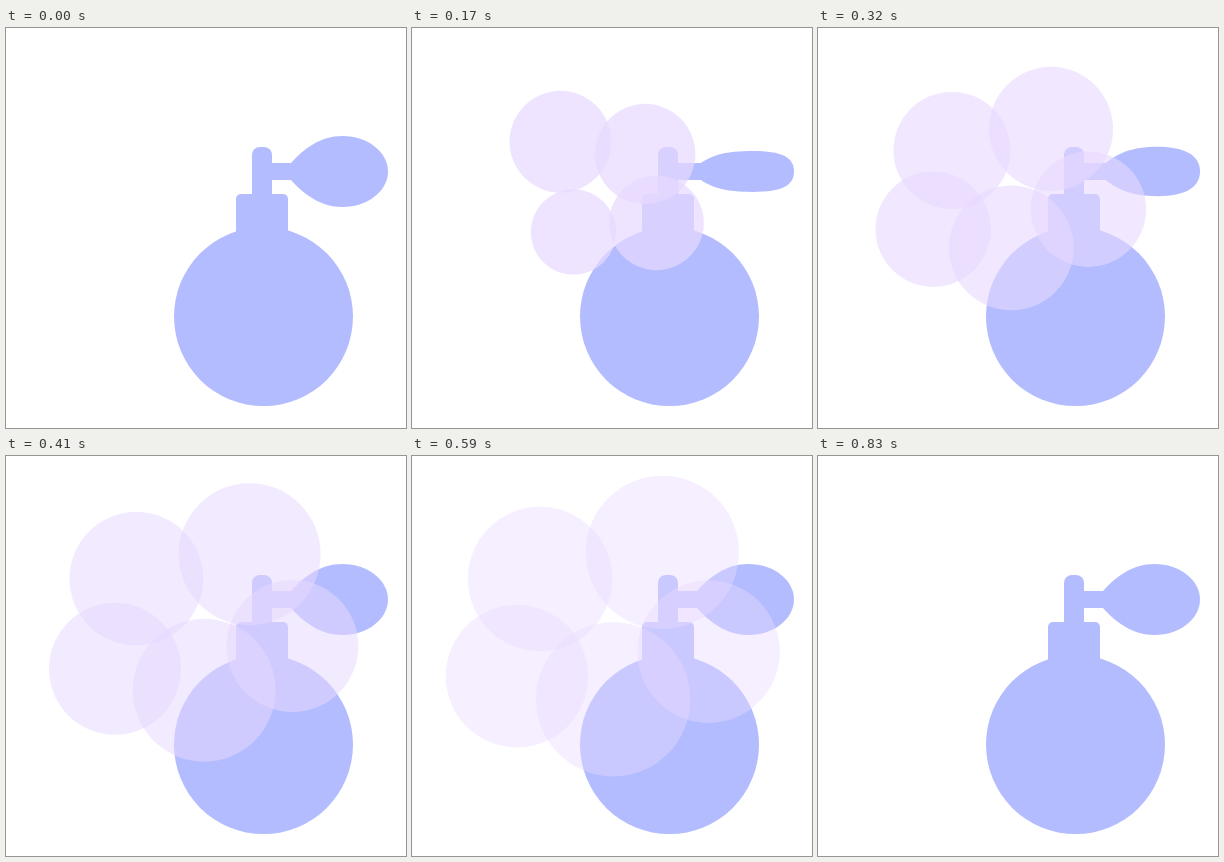
Write an HTML page that moves like this. It is 400 px wide and 400 px high and loops after 860 ms.

```html
<!DOCTYPE html>
<html lang="en">
<head>
<meta charset="utf-8">
<title>Perfume spray</title>
<style>
  html, body { margin: 0; width: 100%; height: 100%; overflow: hidden; background: #fff; }
  svg { display: block; width: 100vw; height: 100vh; }
</style>
</head>
<body>
<svg viewBox="0 0 400 400">
  <g fill="#b3bcff">
    <circle cx="257.5" cy="288.6" r="89.5"/>
    <rect x="230" y="166" width="52" height="60" rx="5"/>
    <rect x="246" y="119" width="20" height="60" rx="8"/>
    <rect x="256" y="135" width="34" height="17"/>
    <path id="bulb"/>
  </g>
  <g id="cloud" fill="#e8d9ff"></g>
</svg>
<script>
const LOOP = 860, START = 100, FADE = 590, END = 830;
const PIVOT = { x: 159, y: 120 };

// Three clouds replace one another; puffs are full-grown [x, y, radius]
const bursts = [
  { from: START, puffs: [[152, 118.5, 62], [248, 167, 45.5], [181.5, 231, 48.5]] },
  { from: 165, puffs: [[144, 111, 72], [264, 128.5, 71], [162.5, 239, 60.5], [280, 226, 67]] },
  { from: 275, puffs: [[127.5, 123, 73.5], [252, 96, 78], [104, 222, 72.5], [299, 197, 72.5], [202, 245.5, 78.5]] }
];

const bulb = document.getElementById('bulb');
const cloud = document.getElementById('cloud');

function add(parent, tag, attrs = {}) {
  const el = document.createElementNS('http://www.w3.org/2000/svg', tag);
  for (const name in attrs) el.setAttribute(name, attrs[name]);
  return parent.appendChild(el);
}

for (const burst of bursts) {
  burst.el = add(cloud, 'g');
  for (const [cx, cy, r] of burst.puffs) add(burst.el, 'circle', { cx, cy, r });
}

const mix = (a, b, u) => a + (b - a) * u;
const grow = age => 1 - 0.31 * Math.exp(-age / 110);

function drawBulb(t) {
  const squeezed = t >= START && t < 410;
  const open = squeezed ? ((t - 210) / 200) ** 2 : 1;
  const cy = 143.5, h = mix(19.8, 35.5, open);
  const left = mix(289, 285, open), mid = mix(341, 336.5, open);
  const c1 = mix(301, 297, open), c2 = mix(313, 314, open);
  const lift = mix(16, 22, open);
  const hx = mix(29, 25, open), hy = mix(14, 19.6, open);
  const top = cy - h, bottom = cy + h;
  bulb.setAttribute('d',
    `M${left} 135C${c1} ${cy - lift} ${c2} ${top} ${mid} ${top}` +
    `C${mid + hx} ${top} 382 ${cy - hy} 382 ${cy}` +
    `C382 ${cy + hy} ${mid + hx} ${bottom} ${mid} ${bottom}` +
    `C${c2} ${bottom} ${c1} ${cy + lift} ${left} 152Z`);
}

function drawCloud(t) {
  const current = t < END ? bursts.findLast(b => t >= b.from) : null;
  for (const b of bursts) b.el.style.display = b === current ? '' : 'none';
  if (!current) return;

  const { x, y } = PIVOT, s = grow(t - current.from);
  current.el.setAttribute('transform', `translate(${x} ${y}) scale(${s}) translate(${-x} ${-y})`);
  const alpha = 0.75 - 0.00067 * (t - START);
  cloud.setAttribute('fill-opacity', alpha * Math.min(1, (END - t) / (END - FADE)));
}

const origin = performance.now();
function frame() {
  const t = (performance.now() - origin) % LOOP;
  drawBulb(t);
  drawCloud(t);
  requestAnimationFrame(frame);
}
frame();
</script>
</body>
</html>
```
